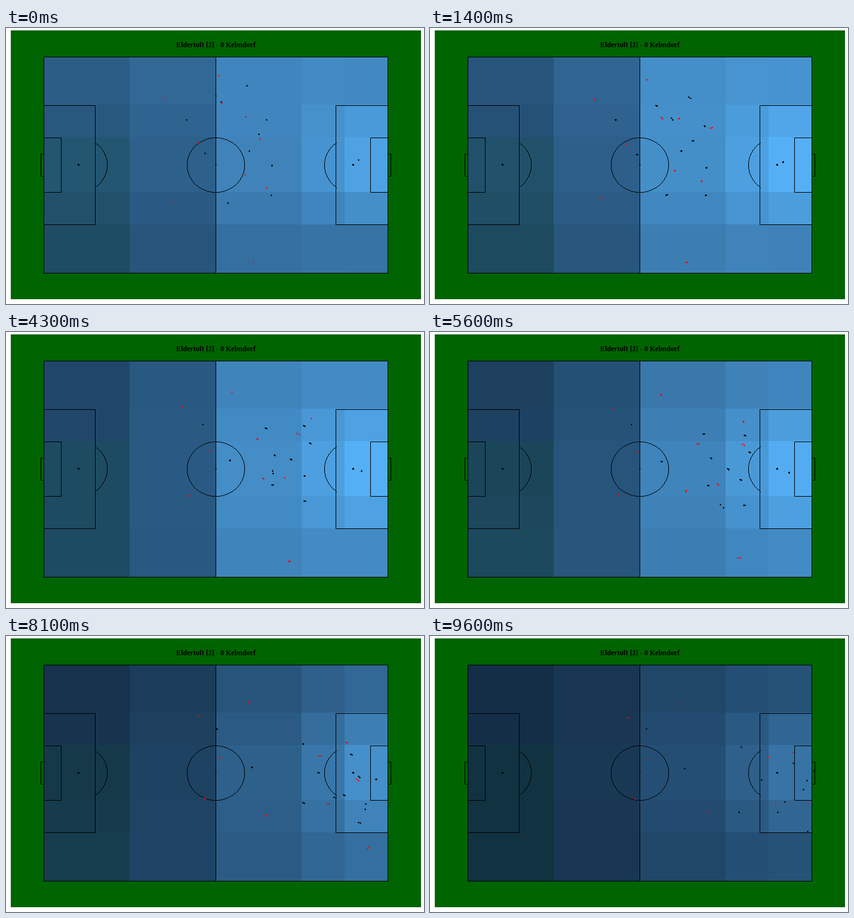
These frames come from a looping animation (700 by 461 pixels, 10000 ms). A matplotlib script:

```python
import numpy as np
import matplotlib.pyplot as plt
from matplotlib.animation import FuncAnimation

W, H, DPI = 700, 461, 100
FRAMES, LAST = 100, 96
MID_X, MID_Y = 351, 229
BLACK, RED, GREEN = (0, 0, 0), (255, 0, 0), (0, 100, 0)

# Each run is a few waypoints, evenly spaced in time.
RED_RUNS = [
    [(266, 117), (331, 137)],
    [(322, 193), (364, 206)],
    [(277, 290), (310, 272), (343, 272)],
    [(356, 80), (381, 103), (417, 114)],
    [(361, 126), (405, 166), (428, 182), (500, 198), (566, 203)],
    [(401, 149), (432, 156), (504, 177), (564, 219), (632, 279)],
    [(425, 186), (497, 156), (515, 145), (550, 169), (608, 195)],
    [(400, 245), (416, 236), (432, 250), (422, 297), (467, 294)],
    [(436, 267), (465, 249), (469, 245), (518, 277), (578, 279)],
    [(414, 391), (443, 390), (487, 380), (584, 367), (632, 326)],
]
BLACK_RUNS = [
    [(302, 154), (362, 156)],
    [(333, 210), (426, 222)],
    [(351, 114), (444, 166), (521, 186)],
    [(371, 292), (454, 254), (517, 294)],
    [(403, 97), (510, 164), (608, 213)],
    [(407, 206), (457, 208), (555, 240)],
    [(423, 178), (485, 219), (582, 294)],
    [(436, 154), (519, 192), (625, 256)],
    [(444, 279), (509, 284), (632, 326)],
    [(445, 230), (507, 242), (594, 277)],
    [(590, 221), (597, 233), (631, 241)],
]
BALL = [(360, 124), (400, 148), (422, 177), (440, 207), (456, 255),
        (510, 308), (587, 356), (606, 262), (643, 226)]

COLS = [63, 207, 351, 495, 567, 639]
ROWS = [49, 129, 183, 274, 328, 409]
SHADES = np.array([(19, 43, 67), (34, 74, 109), (51, 106, 152),
                   (68, 141, 199), (86, 177, 247)])
TEAL = (-3, 4, -8)

# How far control climbs from the left goal to the right one, per column.
RISE_EARLY = np.array([0, 0.23, 0.79, 0.92, 1])
RISE_LATE = np.array([0, 0.17, 0.56, 0.80, 1])
STAGES = [0, 14, 43, 56, 73, 96]


def glide(run, k):
    """Smooth position along a run at step k."""
    p = np.array(run, float)
    v = np.gradient(p, axis=0)
    s = k / LAST * (len(p) - 1)
    i = min(int(s), len(p) - 2)
    u = s - i
    return ((1 + 2 * u) * (1 - u)**2 * p[i] + u * (1 - u)**2 * v[i]
            + u * u * (3 - 2 * u) * p[i + 1] - u * u * (1 - u) * v[i + 1])


def zone_colours(k):
    """Pitch control of the 5 x 5 zones, from dark to light blue."""
    left, right, tilt, late = (np.interp(k, STAGES, values) for values in (
        [32, 28, 23, 19, 12, 3],
        [76, 85, 85, 83, 73, 43],
        [4, 3, 0, -1, -2, 0],
        [0.2, 0, 0, 0.3, 1, 1]))
    col = np.arange(5)
    off = col[:, None] - 2
    rise = (1 - late) * RISE_EARLY + late * RISE_LATE
    goal_pull = 14 * (col / 4)**2 * np.cos(1.25 * off)
    v = left + (right - left) * rise - tilt * off + goal_pull
    rgb = np.stack([np.interp(v / 25, col, c) for c in SHADES.T], axis=-1)
    rgb[2:, 0] += TEAL
    return np.clip(rgb, 0, 255)


def box(x0, y0, x1, y1):
    x0, x1 = sorted((x0, x1))
    lines[[y0, y1], x0:x1 + 1] = True
    lines[y0:y1 + 1, [x0, x1]] = True


def arc(cx, from_x=-48, to_x=48):
    """One-pixel ellipse outline, cut to a range of x offsets."""
    rx, ry = 48, 45
    a, b = np.arange(-35, 36), np.arange(-30, 31)
    y = np.round(ry * np.sqrt(1 - (a / rx)**2)).astype(int)
    x = np.round(rx * np.sqrt(1 - (b / ry)**2)).astype(int)
    for px, py in [(a, y), (a, -y), (x, b), (-x, b)]:
        keep = (px >= from_x) & (px <= to_x)
        lines[MID_Y + py[keep], cx + px[keep]] = True


def dot(img, x, y, colour):
    x, y = round(x), round(y)
    img[y, x - 1:x + 2] = colour
    img[y - 1:y + 2, x] = colour


base = np.full((H, W, 3), 255, np.uint8)
base[5:453, 8:695] = GREEN

lines = np.zeros((H, W), bool)
box(63, 49, 639, 409)
lines[49:409, MID_X] = True
for goal, end, six, area in [(58, 63, 92, 149), (644, 639, 610, 552)]:
    box(end, 130, area, 328)
    box(end, 184, six, 274)
    box(end, 211, goal, 247)
arc(MID_X)
arc(121, from_x=28)
arc(581, to_x=-28)
for spot in (121, 581):
    lines[MID_Y - 1:MID_Y + 2, spot - 1:spot + 2] = True
dot(lines, MID_X, MID_Y, True)


def picture(k):
    img = base.copy()
    zones = np.repeat(zone_colours(k), np.diff(ROWS), axis=0)
    img[ROWS[0]:ROWS[-1], COLS[0]:COLS[-1]] = np.repeat(
        zones, np.diff(COLS), axis=1)
    img[lines] = BLACK
    # A moving dot shows twice, half a step either side.
    half = 0.5 if 0 < k < LAST else 0
    for runs, colour in [(RED_RUNS, RED), (BLACK_RUNS + [BALL], BLACK)]:
        for run in runs:
            for t in (k - half, k + half):
                dot(img, *glide(run, t), colour)
    return img


fig = plt.figure(figsize=(W / DPI, H / DPI), dpi=DPI, facecolor="white")
ax = fig.add_axes([0, 0, 1, 1])
ax.axis("off")
view = ax.imshow(picture(0), aspect="auto", interpolation="nearest")
ax.text(MID_X, 31, "Eldertoft [2] - 0 Kelmdorf", ha="center", va="baseline",
        family="Liberation Serif", weight="bold", size=12 * 72 / DPI)


def draw(frame):
    view.set_data(picture(min(frame, LAST)))
    return [view]


anim = FuncAnimation(fig, draw, frames=FRAMES, interval=100, repeat=True,
                     repeat_delay=0, blit=False)
plt.show()
```
